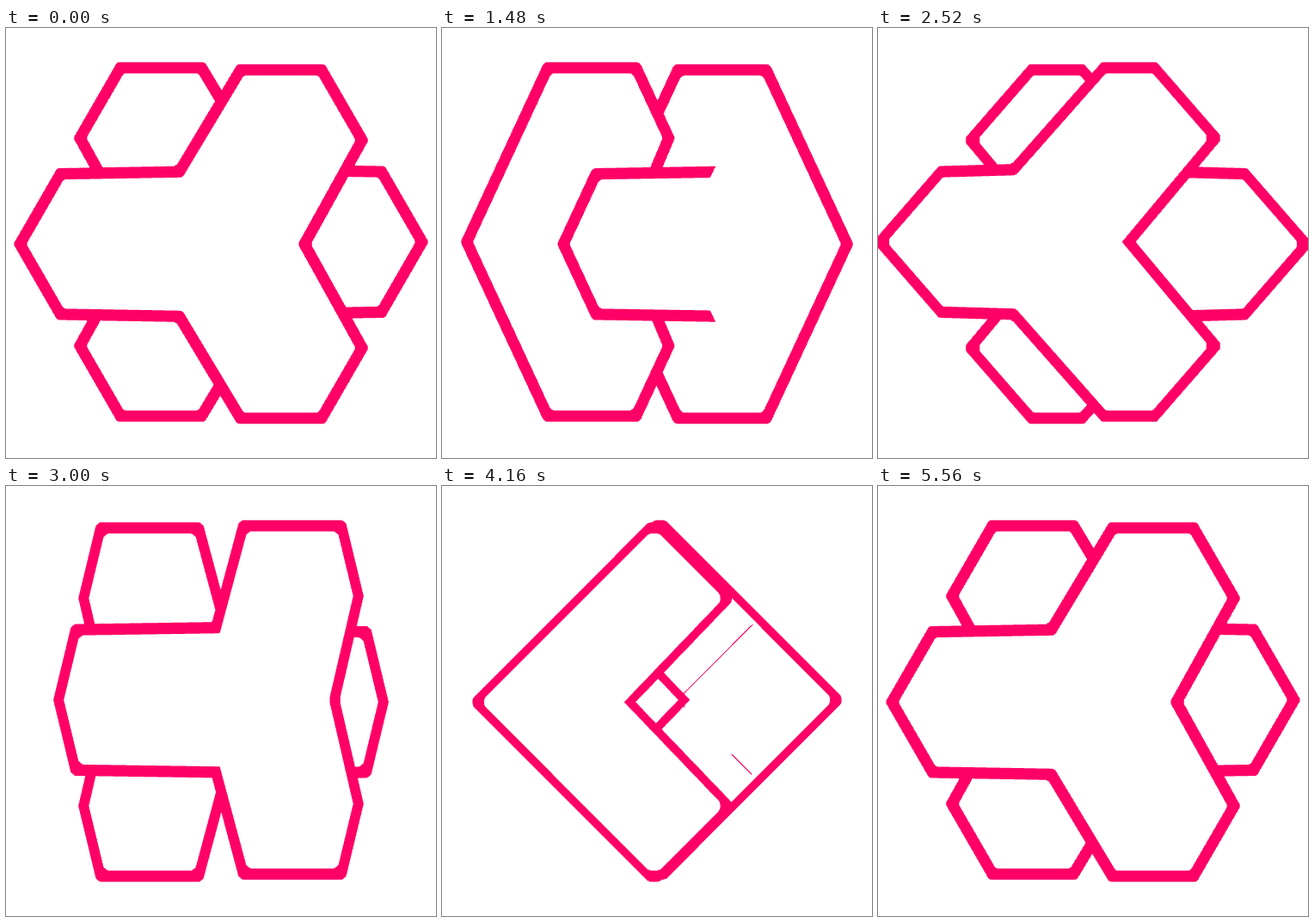
An HTML page with a canvas for the animation above (5600 ms loop, 500 by 500 pixels).

```html
<!DOCTYPE html>
<html lang="en">
<head>
<meta charset="utf-8">
<title>Interlocked tripods</title>
<style>
  html, body { margin: 0; width: 100%; height: 100%; overflow: hidden; background: #fff; }
  canvas { display: block; width: 500px; height: 500px; }
</style>
</head>
<body>
<canvas id="stage" width="500" height="500"></canvas>
<script>
// Two solid tripods, mirrored through the centre of a cube, turn about a vertical
// face diagonal. White bodies sit in slightly larger pink hulls of which only the
// back faces show, which gives the outlines.
const SIZE = 500, MID = 250, SHIFT = 1.25, LOOP = 5600, STEP = 40, LAST = 139;
const ROUND = 10, FILLET = 8, LINE = 9.25, HALF = 141.5, BAR = 112, TAPER = .02;
const START = -Math.atan(Math.SQRT1_2);
const AXES = [0, 1, 2], SIGNS = [-1, 1];

const ctx = document.getElementById('stage').getContext('2d');
const image = ctx.createImageData(SIZE, SIZE);
const pixels = new Uint32Array(image.data.buffer);

// Blends from white (0) to #ff0066 (4), as little-endian ABGR.
const shades = [0, 1, 2, 3, 4].map(n => {
  const g = Math.round(255 * (1 - n / 4)), b = Math.round(255 - 153 * n / 4);
  return (0xff000000 | b << 16 | g << 8 | 255) >>> 0;
});

// Plane that touches the rounding between the given faces, with unit weights.
const blend = (faces, weights) => ({
  n: AXES.map(k => faces.reduce((sum, f, i) => sum + weights[i] * f.n[k], 0)),
  d: faces.reduce((sum, f, i) => sum + weights[i] * (f.d - ROUND), ROUND)
});

const roundEdge = (u, v) => [2, 1, 3].map(k =>
  blend([u, v], [Math.cos(k * Math.PI / 8), Math.sin(k * Math.PI / 8)]));

const face = (axis, sign, d) => ({ n: AXES.map(k => k === axis ? sign : 0), d });

// A bar along one cube edge, slightly thicker towards the shared corner.
function makeBar(axis, half, inner) {
  const sides = AXES.map(i => {
    const top = face(i, 1, i === axis ? half : inner + TAPER * half);
    if (i !== axis) top.n[axis] = TAPER;
    return [face(i, -1, half), top];
  });
  const planes = sides.flat();
  for (const i of AXES) for (let j = 0; j < i; j++)
    for (const u of sides[i]) for (const v of sides[j]) planes.push(...roundEdge(u, v));
  const w = Math.sqrt(1 / 3);
  for (const u of sides[0]) for (const v of sides[1]) for (const t of sides[2])
    planes.push(blend([u, v, t], [w, w, w]));
  return {
    lo: [-half, -half, -half],
    hi: AXES.map(i => i === axis ? half : inner + 2 * TAPER * half),
    planes
  };
}

// A wedge in the inner corner between the two bars that lie across the axis.
function makeFillet(axis, half, inner) {
  const root = inner + TAPER * (half - inner);
  const lo = AXES.map(i => i === axis ? -half : (inner - half) / 2);
  const hi = AXES.map(i => i === axis ? root : root + FILLET);
  const cut = {
    n: AXES.map(i => i === axis ? 0 : Math.SQRT1_2),
    d: root * Math.SQRT2
  };
  const planes = AXES.flatMap(i => [face(i, -1, -lo[i]), face(i, 1, hi[i])]);
  for (const s of SIGNS) planes.push(...roundEdge(cut, planes[2 * axis + (s > 0 ? 1 : 0)]));
  return { lo, hi, planes: [cut, ...planes] };
}

const tripod = (half, bar) => [makeBar, makeFillet].flatMap(make =>
  AXES.map(axis => make(axis, half, bar - half)));

const body = tripod(HALF, BAR);
const hull = tripod(HALF + LINE, BAR + 2 * LINE);

// Turns a convex part into depth bounds z = c - a*x - b*y plus a bounding box.
function project(part, sign, angle) {
  const r = Math.SQRT1_2, c = Math.cos(angle), s = Math.sin(angle);
  const ex = [-c, -s * r, -s * r].map(v => v * sign);
  const ey = [0, r, -r].map(v => v * sign);
  const ez = [s, -c * r, -c * r].map(v => v * sign);
  const dot = (u, v) => u[0] * v[0] + u[1] * v[1] + u[2] * v[2];
  const edge = (e, pick) =>
    AXES.reduce((sum, i) => sum + pick(e[i] * part.lo[i], e[i] * part.hi[i]), 0);
  const bounds = new Float64Array(part.planes.length * 4);
  part.planes.forEach(({ n, d }, i) => {
    let z = dot(n, ez);
    if (Math.abs(z) < 1e-9) z = 1e-9;
    bounds.set([dot(n, ex) / z, dot(n, ey) / z, d / z, z > 0 ? 1 : 0], i * 4);
  });
  return {
    bounds,
    x0: edge(ex, Math.min), x1: edge(ex, Math.max),
    y0: edge(ey, Math.min), y1: edge(ey, Math.max)
  };
}

let near = 0, far = 0;

// Depth interval of a part along the sight line through x, y.
function hit(part, x, y) {
  if (x < part.x0 || x > part.x1 || y < part.y0 || y > part.y1) return false;
  const b = part.bounds;
  near = 1e6;
  far = -1e6;
  for (let i = 0; i < b.length; i += 4) {
    const z = b[i + 2] - b[i] * x - b[i + 1] * y;
    if (b[i + 3]) { if (z < near) near = z; }
    else if (z > far) far = z;
    if (far > near) return false;
  }
  return true;
}

const nears = new Float64Array(6), fars = new Float64Array(6);

// Depth of the first back face of a hull, or -Infinity when it is missed.
function exitDepth(parts, x, y) {
  let count = 0, first = 0;
  for (const part of parts) if (hit(part, x, y)) {
    nears[count] = near;
    fars[count] = far;
    if (near > nears[first]) first = count;
    count++;
  }
  if (!count) return -Infinity;
  let depth = fars[first];
  for (let i = 0; i < count; i++) {
    if (nears[i] >= depth && fars[i] < depth) {
      depth = fars[i];
      i = -1;
    }
  }
  return depth;
}

let pieces = [];

function isPink(px, py) {
  const x = px - MID;
  let back = -Infinity, front = -Infinity;
  for (const piece of pieces) {
    const y = MID - py + piece.sign * SHIFT;
    const depth = exitDepth(piece.hull, x, y);
    if (depth === -Infinity) continue;
    if (depth > back) back = depth;
    for (const part of piece.body) if (hit(part, x, y) && near > front) front = near;
  }
  return back > front ? 1 : 0;
}

const GRID = SIZE / 2 + 1;
const samples = new Uint8Array(GRID * GRID);

// Four samples in a rotated square smooth the edges.
const coverage = (x, y) =>
  isPink(x + .375, y + .125) + isPink(x + .875, y + .375) +
  isPink(x + .125, y + .625) + isPink(x + .625, y + .875);

function draw(frame) {
  const s = frame / LAST;
  const angle = START + 2 * Math.PI * s * s * (3 - 2 * s);
  pieces = [1, -1].map(sign => ({
    sign,
    hull: hull.map(part => project(part, sign, angle)),
    body: body.map(part => project(part, sign, angle))
  }));
  for (let j = 0; j < GRID; j++)
    for (let i = 0; i < GRID; i++) samples[j * GRID + i] = isPink(2 * i, 2 * j);

  for (let j = 0; j < GRID - 1; j++) for (let i = 0; i < GRID - 1; i++) {
    const k = j * GRID + i;
    const sum = samples[k] + samples[k + 1] + samples[k + GRID] + samples[k + GRID + 1];
    for (let n = 0; n < 4; n++) {
      const x = 2 * i + (n & 1), y = 2 * j + (n >> 1);
      pixels[y * SIZE + x] = shades[sum % 4 ? coverage(x, y) : sum];
    }
  }
  ctx.putImageData(image, 0, 0);
}

let shown = -1;
function tick() {
  const frame = Math.min(LAST, Math.floor((performance.now() % LOOP) / STEP + .1));
  if (frame !== shown) draw(shown = frame);
  requestAnimationFrame(tick);
}
tick();
</script>
</body>
</html>
```
